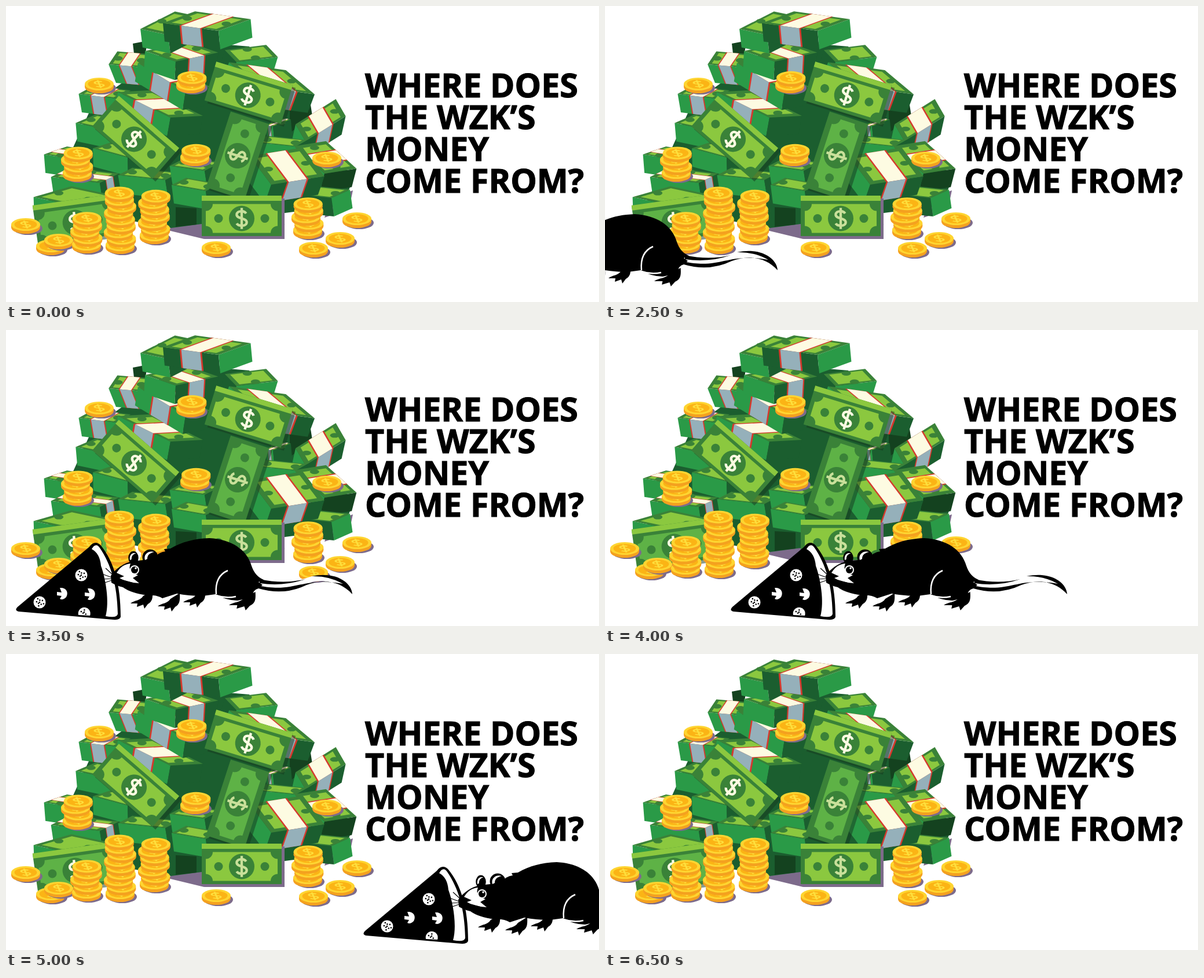
Animation of 1024x512 px, one loop 7000 ms. Source, as an HTML page:

```html
<!DOCTYPE html>
<html lang="en">
<head>
<meta charset="utf-8">
<title>Money pile</title>
<style>
html, body { margin: 0; width: 100%; height: 100%; overflow: hidden; background: #fff; }
svg { display: block; width: 100vw; height: 100vh; }
text { font: 700 57.3px "Open Sans", sans-serif; stroke: #000; stroke-width: 1.2px; }
</style>
</head>
<body>
<svg viewBox="0 0 1024 512">
  <defs>
    <path id="paw" d="M0,0 C7,-6 16,-4 22,-13 L38,-23 C39,-8 37,-3 30,1 L24,9 L22,2 L11,6 L12,0Z"/>
    <g id="ear">
      <circle r="13.5"/>
      <path fill="#fff" d="M-9,5 C-12,-5 -3,-12 7,-9 C-2,-7 -5,-3 -5,3Z"/>
    </g>
  </defs>
  <g id="pile"></g>
  <g id="title"></g>
  <g id="rat">
    <g id="pizza">
      <path d="M344,375 C350,366 358,366 364,373 C386,400 398,440 398,496 Q397,502 385,501 L222,487 Q214,485 220,479Z"/>
      <path fill="#fff" d="M348,379 C353,370 358,371 362,377 C381,405 392,440 393,491 Q392,499 372,495 C379,470 372,430 364,408 Q362,386 348,379Z"/>
      <g id="toppings" fill="#fff">
        <path id="mushroom" d="M293,446 C303,445 309,453 304,462 Q298,468 293,465 L296,460 L288,459 V453 L296,454Z"/>
        <use href="#mushroom" x="48" y="1"/>
        <path d="M325,493 A10.500,10.500 0 1 1 345,494Z"/>
      </g>
    </g>
    <g id="tail">
      <path fill="#fff" d="M640,434 C670,440 700,436 728,426 C760,421 788,436 798,456 C770,430 740,430 712,441 Q680,458 640,448Z"/>
      <path d="M638,431 Q680,440 717,431 Q680,444 638,438Z"/>
      <path d="M636,442 C700,456 710,426 782,439 Q758,425 728,426 C770,417 797,437 798,457 C778,435 750,430 719,441 Q680,460 636,447Z"/>
    </g>
    <path d="M381,425 C390,412 404,403 418,400 L455,396 Q463,384 475,383 L473,379 L484,378 C505,366 525,361 551,360 C590,362 616,380 624,408 Q630,426 645,432 L636,436 L643,441 L636,447 Q625,450 626,462 L600,468 Q580,468 562,457 L540,460 Q515,460 495,456 L470,464 Q460,458 445,459 Q415,455 402,445 Q390,442 382,437Z"/>
    <use href="#paw" x="415" y="473"/>
    <use href="#paw" x="462" y="478"/>
    <use href="#paw" x="506" y="471"/>
    <use href="#paw" transform="translate(585 476) scale(1.2 1)"/>
    <path fill="none" stroke="#fff" stroke-width="2.5" d="M563,457 Q560,426 583,416 M563,459 Q580,465 597,461"/>
    <use href="#ear" transform="translate(420 394) scale(.65 .85)"/>
    <use href="#ear" x="449" y="393"/>
    <path fill="#fff" d="M391,420 Q400,405 415,404 Q409,418 428,424 L419,429 L430,438 Q408,437 396,429 L404,426Z"/>
    <circle cx="422" cy="415" r="8" fill="#fff"/>
    <circle cx="422" cy="415" r="6"/>
    <circle cx="424" cy="412" r="1.8" fill="#fff"/>
    <path fill="none" stroke="#000" stroke-width="1.2" d="M388,430 L366,422 M388,430 L364,431 M388,431 L368,438 M386,425 L372,412 M396,431 L421,438"/>
  </g>
</svg>
<script>
const FRAME = '#3a8238', LIME = '#8bc83f', LEAF = '#5eb246', MID = '#2a9a47',
      DARK = '#1b5e2f', DEEP = '#14421f', CREAM = '#fdfbe2', GREY = '#95b0ba',
      RED = '#d5392d', SHADE = '#7d6b8b', PALE = '#c9e09a';
const DOLLAR = 'M7,-8 C4,-13 -8,-13 -8,-6 C-8,1 8,-1 8,6 C8,13 -5,13 -8,8 M0,-17 V17';

const el = id => document.getElementById(id);
let out = '';
const poly = (fill, pts) => { out += `<polygon points="${pts}" fill="${fill}"/>`; };
const ellipse = (fill, x, y, rx, ry) => {
  out += `<ellipse cx="${x}" cy="${y}" rx="${rx}" ry="${ry}" fill="${fill}"/>`;
};

// A wad of notes seen from its front corner (x, y): the left edge is `a` long
// and rises by `ta` degrees, the right edge is `b` long and rises by `tb`.
// The paper band wraps over the 'L' or 'R' edge.
function wad(x, y, a, ta, b, tb, band = '', left = MID, right = DARK) {
  const rad = Math.PI / 180;
  const top = (u, v) => [
    x - u * a * Math.cos(ta * rad) + v * b * Math.cos(tb * rad),
    y - u * a * Math.sin(ta * rad) - v * b * Math.sin(tb * rad)];
  const low = ([px, py]) => [px + (tb - ta) / 4, py + 32];
  const side = (fill, p, q) => poly(fill, [p, q, low(q), low(p)]);
  side(left, top(1, 0), top(0, 0));
  side(right, top(0, 0), top(0, 1));
  poly(FRAME, [top(0, 0), top(1, 0), top(1, 1), top(0, 1)]);
  poly(LIME, [top(.1, .1), top(.9, .1), top(.9, .9), top(.1, .9)]);
  const at = band === 'R' ? (u, v) => top(v, u) : top;
  for (const u of [.15, .85]) ellipse(FRAME, ...at(u, .5), 8, 4);
  if (!band) return;
  for (const [grow, face, lid] of [[.03, RED, RED], [0, GREY, CREAM]]) {
    const p = .33 - grow, q = .67 + grow;
    poly(lid, [at(p, 0), at(q, 0), at(q, 1), at(p, 1)]);
    side(face, at(p, 0), at(q, 0));
  }
}

function bill(x, y, turn, face, ink, shade = '#17391f80', edge = 9) {
  const note = '<rect x="-69" y="-35" width="138"';
  out += `<g transform="translate(${x + 5} ${y + 5}) rotate(${turn})">${note} height="70" fill="${shade}"/></g>
    <g transform="translate(${x} ${y}) rotate(${turn})">
    ${note} height="70" fill="${FRAME}"/>${note} height="${edge}" fill="${LIME}"/>
    <g transform="translate(0 ${edge / 2})" fill="${FRAME}">
    <path fill="${face}" d="M-50,-25 H50 A12,12 0 0 0 62,-13 V13 A12,12 0 0 0 50,25 H-50 A12,12 0 0 0 -62,13 V-13 A12,12 0 0 0 -50,-25Z"/>
    <circle r="22"/><circle cx="-40" r="7.5"/><circle cx="40" r="7.5"/>
    <path d="${DOLLAR}" transform="scale(1.08)" fill="none" stroke="${ink}" stroke-width="4"/></g></g>`;
}

function coin(x, y) {
  ellipse('#f4a11f', x, y + 5, 25, 11);
  out += `<rect x="${x - 25}" y="${y}" width="50" height="5" fill="#f4a11f"/>`;
  ellipse('#fed531', x, y, 25, 11);
  ellipse('#fbb415', x, y, 19.5, 8);
  out += `<path d="${DOLLAR}" transform="translate(${x} ${y}) scale(.85 .4) rotate(-12)" fill="none" stroke="#fede3c" stroke-width="4"/>`;
}

// Coins piled up from (x, y) with a slight sway.
function stack(x, y, count = 1) {
  ellipse(SHADE, x + 4, y + 7, 25, 11);
  for (let i = 0; i < count; i++) coin(x + 3 * Math.sin(i * 2.3), y - i * 11.2);
}

// ground shade and the dark core
poly(SHADE, '280,388 325,345 482,378 342,403');
poly(SHADE, '560,332 599,319 592,352 550,366');
poly(DARK, '300,60 420,70 600,300 580,345 285,384 70,345 150,170');
poly(DEEP, '219,65 245,60 240,85 221,82');
poly(DEEP, '490,163 525,165 529,190 490,220');
poly(DEEP, '293,348 329,350 329,378 293,382');

// upper wads
wad(398, 97, 29, 46, 72, 7, '', DARK, MID);
wad(435, 139, 65, 40, 99, -8, 'R');
wad(235, 106, 58, 5, 27, 56, 'L');
wad(190, 160, 65, 7, 29, 29, 'L');
wad(284, 193, 101, 26, 56, 3, 'L');
wad(310, 148, 96, 31, 43, 11, 'L');
wad(293, 96, 56, 19, 75, 12, 'R');
wad(280, 50, 49, 12, 67, 27);
wad(367, 43, 97, 8, 59, 20, 'L', DARK, MID);

// lower left wads
wad(180, 215, 61, 12, 38, 23);
wad(112, 264, 47, 9, 42, 19, 'R');
wad(210, 262, 62, 15, 32, 18);
wad(162, 306, 85, 7, 37, 26, 'R');
wad(275, 301, 82, 6, 28, 27);
wad(120, 346, 74, 12, 68, 16);
wad(343, 285, 61, 8, 32, 27);
wad(345, 320, 60, 10, 28, 26);

// lower right wads
wad(461, 208, 13, 9, 33, 21, 'L');
wad(517, 234, 34, 60, 82, 32, 'R');
wad(500, 243, 70, 6, 23, 29);
wad(550, 290, 71, 42, 56, 9, 'L', MID, DEEP);
wad(562, 332, 62, 6, 35, 24, '', DARK, MID);
wad(458, 309, 62, 53, 93, 9, 'R');

// loose notes
bill(419, 150, 17, LIME, CREAM);
bill(224, 227, 41, LIME, CREAM);
bill(400, 259, 108, LEAF, PALE, '#17391f80', 0);
bill(119, 370, -8, LEAF, CREAM);
bill(407, 363, 0, LIME, PALE, SHADE);

// coins
stack(161, 135);
stack(319, 135, 2);
stack(123, 288, 4);
stack(326, 261, 2);
stack(554, 263);
stack(521, 387, 5);
stack(34, 378);
stack(197, 413, 9);
stack(256, 396, 7);
stack(77, 415);
stack(91, 405);
stack(139, 412, 5);
stack(363, 418);
stack(531, 419);
stack(577, 402);
stack(606, 368);
el('pile').innerHTML = out;

el('title').innerHTML = ['WHERE DOES', 'THE WZK’S', 'MONEY', 'COME FROM?']
  .map((line, i) => `<text x="620" y="${158 + 55 * i}">${line}</text>`).join('');

// pepperoni with dark specks
const speck = (x, y, r, fill) => `<circle cx="${x}" cy="${y}" r="${r}" fill="${fill}"/>`;
function pepperoni(x, y, count) {
  let dots = '';
  for (let i = 0; i < count; i++) {
    const a = i * 2.4, r = 2.6 * Math.sqrt(i);
    dots += speck(x + r * Math.cos(a), y + r * Math.sin(a), 1.3, '#000');
  }
  return dots;
}
el('toppings').innerHTML += speck(330, 424, 10.5, '#fff') + speck(258, 471, 10.5, '#fff') +
  pepperoni(330, 424, 9) + pepperoni(258, 471, 9) + pepperoni(335, 488, 5);

// the rat hops every half second, between 2 s and 6.5 s
const rat = el('rat');
const hops = [-630, -500, -350, -200, 0, 200, 400, 500, 600];
function draw(now) {
  const x = hops[Math.floor((now % 7000 - 2000) / 500)];
  rat.setAttribute('visibility', x === undefined ? 'hidden' : 'visible');
  rat.setAttribute('transform', `translate(${x ?? 0} 0)`);
}
function tick() {
  draw(performance.now());
  requestAnimationFrame(tick);
}
tick();
</script>
</body>
</html>
```
